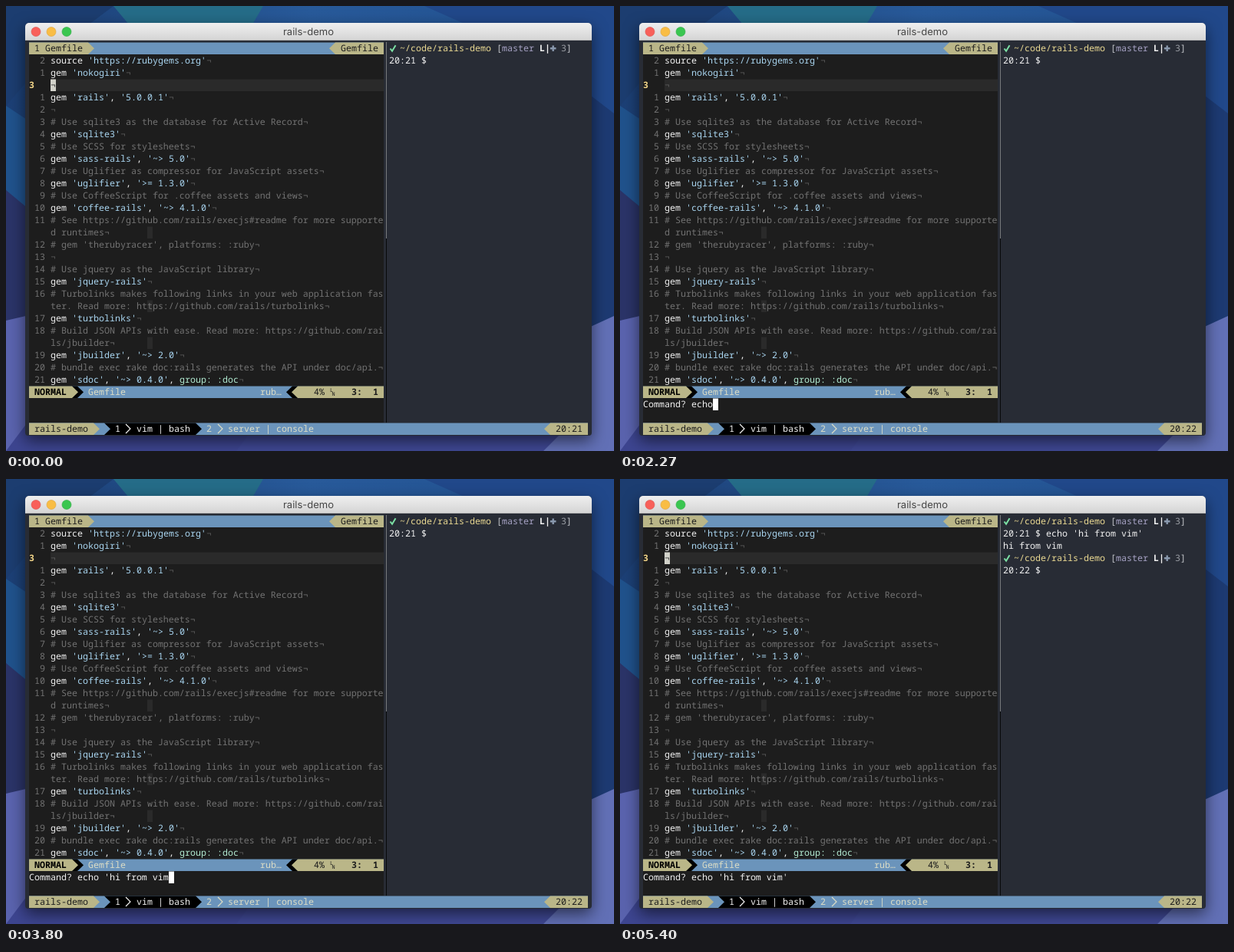
Recreate the animation shown at these times as an HTML page. Size 792 by 580 pixels, loop 5.47 s.

```html
<!DOCTYPE html>
<html lang="en">
<head>
<meta charset="utf-8">
<title>rails-demo</title>
<style>
html, body { margin: 0; width: 100%; height: 100%; overflow: hidden; background: #1b2f5d; }
svg { display: block; }
text {
  font: 500 11.6667px "Noto Sans Mono", "DejaVu Sans Mono", monospace;
  font-variant-ligatures: none;
  white-space: pre;
  text-rendering: geometricPrecision;
}
text.title { font: 400 13px Inter, "Liberation Sans", sans-serif; }
text.tiny { font-size: 6.8px; }
.window { filter: drop-shadow(0 7px 10px rgba(0, 0, 0, .55)); }
</style>
</head>
<body>
<svg id="stage" width="792" height="580" viewBox="0 0 792 580">
  <defs>
    <linearGradient id="sky" x2="1" y2="0">
      <stop offset="0" stop-color="#1c3f75"/>
      <stop offset=".5" stop-color="#285a9a"/>
      <stop offset="1" stop-color="#21508f"/>
    </linearGradient>
    <linearGradient id="bar" x2="0" y2="1">
      <stop offset="0" stop-color="#efefef"/>
      <stop offset="1" stop-color="#d4d4d4"/>
    </linearGradient>
  </defs>
  <rect width="792" height="580" fill="url(#sky)"/>
  <path d="M0 0H140L60 60L0 130Z" fill="#1c3d70"/>
  <path d="M140 0H335L300 60H190Z" fill="#256c88"/>
  <path d="M545 0H792V140L680 60Z" fill="#21488a"/>
  <path d="M0 130L60 170V300L0 240Z" fill="#20528c"/>
  <path d="M0 240L60 290V420H0Z" fill="#2b3468"/>
  <path d="M740 100L792 140V420H740Z" fill="#1d3a72"/>
  <path d="M0 410L60 396V580H0Z" fill="#5a63ae"/>
  <path d="M740 428L792 404V580H700Z" fill="#6270b6"/>
  <path d="M0 580L60 500L330 540V580Z" fill="#3d4590"/>
  <path d="M330 540H740L700 580H300Z" fill="#3f4894"/>
  <path class="window" d="M25 27a5 5 0 0 1 5-5H758a5 5 0 0 1 5 5V556a4 4 0 0 1-4 4H29a4 4 0 0 1-4-4Z" fill="#282c35"/>
  <path d="M25 45V27a5 5 0 0 1 5-5H758a5 5 0 0 1 5 5V45Z" fill="url(#bar)"/>
  <path d="M25 44.5H763" stroke="#b4b4b4"/>
  <g stroke-width=".6">
    <circle cx="39" cy="33.5" r="6" fill="#f8605a" stroke="#d9504a"/>
    <circle cx="59" cy="33.5" r="6" fill="#f9bd45" stroke="#dca23a"/>
    <circle cx="79" cy="33.5" r="6" fill="#3ac650" stroke="#30a843"/>
  </g>
  <text class="title" x="394" y="38" text-anchor="middle" fill="#474747">rails-demo</text>
</svg>
<script>
const LOOP = 5470, CELL = 7, ROW = 16, LEFT = 30, TOP = 47;
const TAN = '#bab688', BLUE = '#6b94bb', INK = '#1c1c1c', BLACK = '#000', WHITE = '#f2f2f2',
      PALE = '#dcddc6', DIM = '#727272', STRING = '#a9d5f0', SYMBOL = '#b3ecd3', LINE = '#2a2a2a';
const COMMAND = "echo 'hi from vim'";
const AT = { comma: 600, prompt: 1070, minute: 1330, type: 1740, key: 115, enter: 4730 };

const stage = document.getElementById('stage');
const colX = col => LEFT + col * CELL;
const rowY = row => TOP + row * ROW;

function add(tag, attrs, parent = stage) {
  const el = document.createElementNS('http://www.w3.org/2000/svg', tag);
  for (const key in attrs) el.setAttribute(key, attrs[key]);
  return parent.appendChild(el);
}
const group = () => add('g', {});
const path = (d, fill, parent) => add('path', { d, fill }, parent);
const box = (x, row, width, fill, parent) =>
  add('rect', { x, y: rowY(row) + .5, width, height: ROW - .5, fill }, parent);

function print(col, row, str, fill, weight = 500, parent = stage) {
  const el = add('text', { x: colX(col), y: rowY(row) + 12, fill }, parent);
  el.style.fontWeight = weight;
  el.textContent = str;
  return el;
}
// Filled triangle whose tip lies at x + dx.
const tip = (x, row, dx, fill) => path(`M${x} ${rowY(row) + .5}l${dx} 7.75l${-dx} 7.75Z`, fill);
const chevron = (x, row, stroke) =>
  add('path', { d: `M${x} ${rowY(row) + 2}l6 6l-6 6`, fill: 'none', stroke, 'stroke-width': 1.2 });

function printCode(row, str) {
  let col = 4;
  for (const part of str.match(/'[^']*'|group:|:doc|¬|[^'¬:]+?(?='|¬|group:|:doc|$)/g)) {
    const fill = part[0] === "'" ? STRING : part === '¬' ? '#5c5c5c'
      : /^(group:|:doc)$/.test(part) ? SYMBOL : WHITE;
    print(col, row, part, fill);
    col += part.length;
  }
}

// Editor
const lines = [
  [2, "source 'https://rubygems.org'¬"],
  [1, "gem 'nokogiri'¬"],
  [3, '¬'],
  [1, "gem 'rails', '5.0.0.1'¬"],
  [2, '¬'],
  [3, '# Use sqlite3 as the database for Active Record¬'],
  [4, "gem 'sqlite3'¬"],
  [5, '# Use SCSS for stylesheets¬'],
  [6, "gem 'sass-rails', '~> 5.0'¬"],
  [7, '# Use Uglifier as compressor for JavaScript assets¬'],
  [8, "gem 'uglifier', '>= 1.3.0'¬"],
  [9, '# Use CoffeeScript for .coffee assets and views¬'],
  [10, "gem 'coffee-rails', '~> 4.1.0'¬"],
  [11, '# See https://github.com/rails/execjs#readme for more supporte'],
  ['', 'd runtimes¬'],
  [12, "# gem 'therubyracer', platforms: :ruby¬"],
  [13, '¬'],
  [14, '# Use jquery as the JavaScript library¬'],
  [15, "gem 'jquery-rails'¬"],
  [16, '# Turbolinks makes following links in your web application fas'],
  ['', 'ter. Read more: https://github.com/rails/turbolinks¬'],
  [17, "gem 'turbolinks'¬"],
  [18, '# Build JSON APIs with ease. Read more: https://github.com/rai'],
  ['', 'ls/jbuilder¬'],
  [19, "gem 'jbuilder', '~> 2.0'¬"],
  [20, '# bundle exec rake doc:rails generates the API under doc/api.¬'],
  [21, "gem 'sdoc', '~> 0.4.0', group: :doc¬"]
];
add('rect', { x: 30, y: 47, width: 462, height: 496, fill: '#1d1d1d' });
box(58, 3, 434, LINE);
for (const row of [15, 21, 24]) box(184, row, 7, LINE);
lines.forEach(([num, str], i) => {
  const row = i + 1;
  if (row === 3) print(0, row, '3', '#f5d78a', 600);
  else print(1, row, String(num).padStart(2), DIM);
  if (num === '' || str[0] === '#') print(4, row, str, DIM);
  else printCode(row, str);
});
const editCursor = group();
box(58, 3, 7, '#d2d2ca', editCursor);
print(4, 3, '¬', '#333', 500, editCursor);

// Tab line
box(30, 0, 462, BLUE);
box(30, 0, 77, TAN);
tip(107, 0, 8, TAN);
box(429, 0, 63, TAN);
tip(429, 0, -8, TAN);
print(1, 0, '1 Gemfile', INK);
print(58, 0, 'Gemfile', INK);

// Status line
box(30, 28, 462, BLUE);
box(30, 28, 63, BLACK);
tip(93, 28, 8, BLACK);
box(30, 28, 56, TAN);
tip(86, 28, 8, TAN);
box(373, 28, 119, BLACK);
tip(373, 28, -8, BLACK);
box(380, 28, 112, TAN);
tip(380, 28, -8, TAN);
print(1, 28, 'NORMAL', BLACK, 700);
print(11, 28, 'Gemfile', PALE);
print(43, 28, 'rub…', PALE);
print(53, 28, '4%', INK);
print(60, 28, '3:', INK, 600);
print(64, 28, '1', INK, 600);
for (const [x, y, str] of [[422, 503, 'L'], [424.5, 508, 'N']])
  add('text', { x, y, class: 'tiny', fill: INK }).textContent = str;

// Command line
const pending = print(55, 30, ',', WHITE);
const prompt = print(0, 29, '', WHITE);
const promptCursor = box(0, 29, 7, '#fff');

// Pane border
add('rect', { x: 495, y: 47, width: 1, height: 256, fill: '#77797b' });
add('rect', { x: 495, y: 303, width: 1, height: 240, fill: '#08090b' });

// Shell
function shellPrompt(row, time, parent) {
  const y = rowY(row);
  add('path', { d: `M500.5 ${y + 8.5}l2.5 3.2l4.5-7.5`, fill: 'none', stroke: '#7be0a4', 'stroke-width': 2 }, parent);
  print(69, row, '~/code/rails-demo', '#ead992', 500, parent);
  print(87, row, '[', '#c4c6ca', 500, parent);
  print(88, row, 'master', '#a7a3c5', 500, parent);
  print(95, row, 'L|', WHITE, 600, parent);
  path(`M711.5 ${y + 4.5}h2.4v2.6h2.6v2.4h-2.6v2.6h-2.4v-2.6h-2.6v-2.4h2.6Z`, '#8998ad', parent);
  print(99, row, '3', '#9a9da4', 500, parent);
  print(100, row, ']', '#c4c6ca', 500, parent);
  print(67, row + 1, time + ' $', WHITE, 500, parent);
}
shellPrompt(0, '20:21');
const output = group();
print(75, 1, COMMAND, WHITE, 500, output);
print(67, 2, 'hi from vim', WHITE, 500, output);
shellPrompt(3, '20:22', output);

// Session bar
box(30, 31, 728, BLUE);
box(30, 31, 84, TAN);
tip(114, 31, 8, TAN);
box(128, 31, 119, BLACK);
tip(128, 31, 8, BLUE);
tip(247, 31, 8, BLACK);
box(709, 31, 49, TAN);
tip(709, 31, -8, TAN);
print(1, 31, 'rails-demo', INK);
print(16, 31, '1', WHITE);
chevron(156, 31, WHITE);
print(20, 31, 'vim | bash', WHITE);
print(33, 31, '2', PALE);
chevron(276, 31, PALE);
print(37, 31, 'server | console', PALE);
const clock = print(98, 31, '', INK);

const show = (el, on) => el.setAttribute('visibility', on ? 'visible' : 'hidden');
const write = (el, str) => { if (el.textContent !== str) el.textContent = str; };

function draw(t) {
  const asking = t >= AT.prompt, done = t >= AT.enter;
  const typed = Math.max(0, Math.min(COMMAND.length, Math.floor((t - AT.type) / AT.key)));
  write(prompt, asking ? 'Command? ' + COMMAND.slice(0, typed) : '');
  write(clock, t < AT.minute ? '20:21' : '20:22');
  promptCursor.setAttribute('x', colX(9 + typed));
  show(promptCursor, asking && !done);
  show(editCursor, !asking || done);
  show(pending, t >= AT.comma && !asking);
  show(output, done);
}

const start = performance.now();
function tick() {
  draw((performance.now() - start) % LOOP);
  requestAnimationFrame(tick);
}
tick();
</script>
</body>
</html>
```
